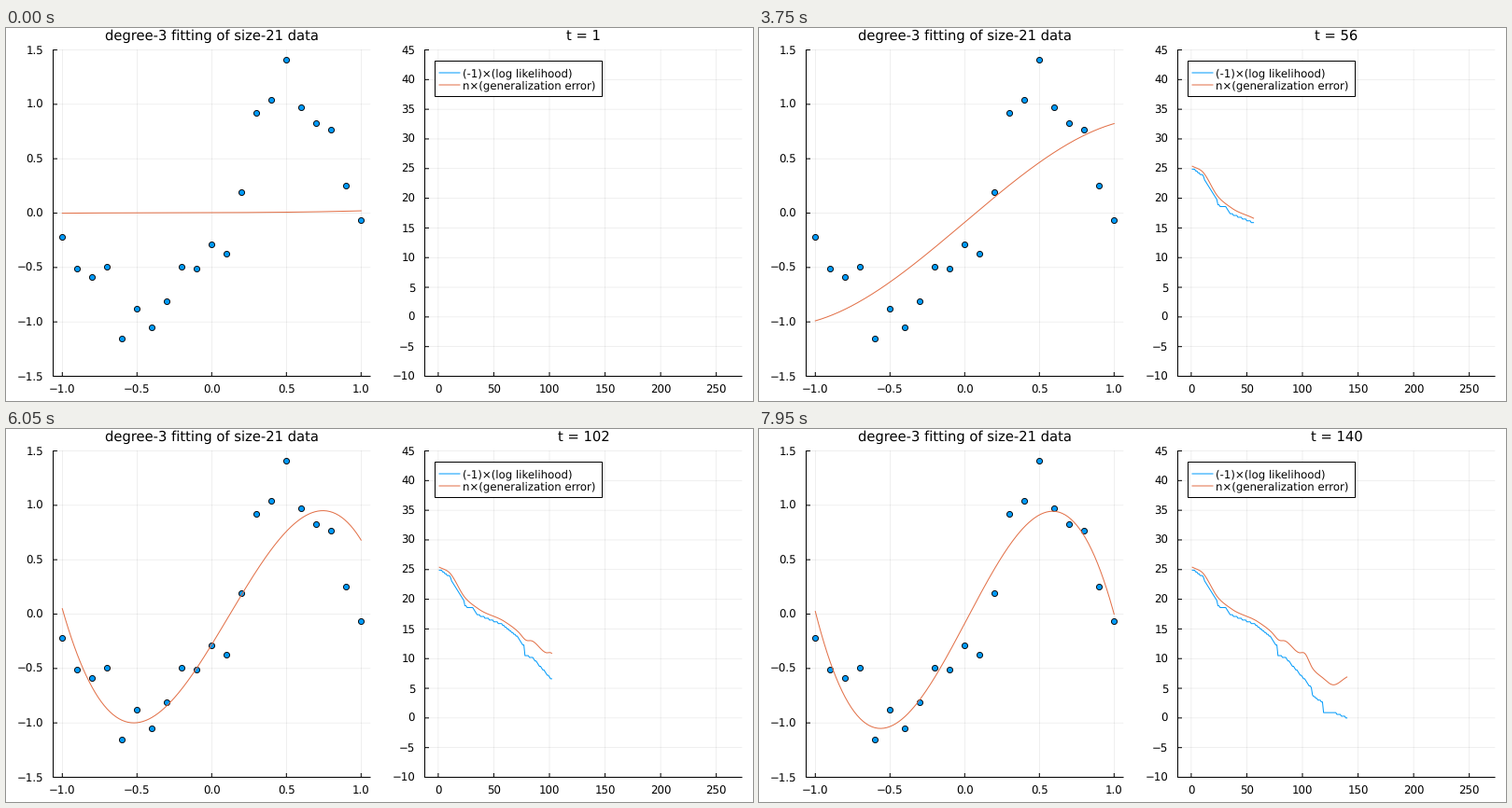
A matplotlib script for the animation above (8 s loop, 800 px wide and 400 px high).

```python
import numpy as np
import matplotlib.pyplot as plt
from matplotlib.animation import FuncAnimation

DPI = 100
PX = 72 / DPI  # points per pixel
BLUE, ORANGE = "#009afa", "#e26f46"
HOLD, FRAMES, INTERVAL = 19, 160, 50

plt.rcParams.update({"font.family": "DejaVu Sans", "text.hinting": "none"})
fig = plt.figure(figsize=(8, 4), dpi=DPI, facecolor="white")
ax = fig.add_axes([0, 0, 1, 1])
ax.set(xlim=(0, 800), ylim=(400, 0))
ax.axis("off")


class Panel:
    """Maps data coordinates to stage pixels and draws axes and grid."""

    TOP, BOTTOM = 23.5, 373.5

    def __init__(self, left, right, x0, x_unit, y_min, y_max):
        self.left, self.right = left, right
        self.x0, self.x_unit = x0, x_unit
        self.y_max = y_max
        self.y_unit = (self.BOTTOM - self.TOP) / (y_max - y_min)

    def x(self, v):
        return self.x0 + self.x_unit * np.asarray(v)

    def y(self, v):
        return self.TOP + self.y_unit * (self.y_max - np.asarray(v))

    def draw_axes(self, xticks, yticks, fmt):
        black = dict(color="black", lw=PX, snap=False)
        grid = dict(color="black", alpha=0.1, lw=0.6 * PX, snap=False)
        for v in xticks:
            x = self.x(v)
            ax.plot([x, x], [self.TOP, self.BOTTOM], **grid)
            ax.plot([x, x], [self.BOTTOM, self.BOTTOM - 4], **black)
            label(x, 391.5, fmt(v), ha="center")
        for v in yticks:
            y = self.y(v)
            ax.plot([self.left, self.right], [y, y], **grid)
            ax.plot([self.left, self.left + 4], [y, y], **black)
            label(self.left - 10.3, y + 4.3, fmt(v), ha="right")
        ax.plot([self.left, self.left, self.right],
                [self.TOP, self.BOTTOM, self.BOTTOM], **black)


def label(x, y, text, size=11.75, ha="left"):
    return ax.text(x, y, text, fontsize=size * PX, ha=ha, va="baseline")


def number(digits):
    return lambda v: f"{v:.{digits}f}".replace("-", "\u2212")


def hermite(t, keys, values):
    """Smooth curve through values given at the key iterations."""
    keys, values = np.asarray(keys), np.asarray(values)
    slopes = np.gradient(values, keys, axis=0)
    k = min(np.searchsorted(keys, t, side="right") - 1, len(keys) - 2)
    h = keys[k + 1] - keys[k]
    s = (t - keys[k]) / h
    ease = s * s * (3 - 2 * s)
    return (values[k] * (1 - ease) + values[k + 1] * ease
            + h * s * (1 - s) ** 2 * slopes[k]
            - h * s * s * (1 - s) * slopes[k + 1])


fit = Panel(50.5, 390, 220.3, 160, -1.5, 1.5)
trace = Panel(448.5, 788, 462.9, 1.191, -10, 45)
fit.draw_axes(np.arange(-1, 1.1, 0.5), np.arange(-1.5, 1.6, 0.5), number(1))
trace.draw_axes(range(0, 251, 50), range(-10, 46, 5), number(0))

label(220.3, 13, "degree-3 fitting of size-21 data", 14.74, "center")
title = label(618.5, 13, "", 14.74, "center")

samples = [-0.217, -0.51, -0.585, -0.492, -1.15, -0.88, -1.05, -0.81, -0.492,
           -0.507, -0.285, -0.372, 0.19, 0.923, 1.04, 1.41, 0.972, 0.828,
           0.767, 0.256, -0.066]
ax.scatter(fit.x(np.linspace(-1, 1, 21)), fit.y(samples), s=(6.1 * PX) ** 2,
           fc=BLUE, ec="black", lw=0.9 * PX, zorder=2)

# Legend
ax.add_patch(plt.Rectangle((459.5, 35.5), 179, 38, fc="white", ec="black",
                           lw=PX, snap=False, zorder=4))
for y, color, text in [(48, BLUE, "(-1)×(log likelihood)"),
                       (61, ORANGE, "n×(generalization error)")]:
    ax.plot([464, 486], [y, y], color=color, lw=PX, snap=False, zorder=5)
    label(489, y + 4.2, text).set_zorder(5)

# Cubic coefficients, constant term first, at a few iterations
fit_keys = [1, 18, 36, 53, 76, 102, 119, 127, 140]
fit_coefs = [
    [0.004, 0.004, 0.006, 0.007],
    [0.01, 0.155, 0.033, 0.092],
    [-0.045, 0.577, -0.04, 0.165],
    [-0.08, 1.1, -0.02, -0.2],
    [-0.11, 1.454, 0.243, -0.662],
    [-0.28, 2.24, 0.645, -1.925],
    [-0.17, 2.65, 0.3, -2.55],
    [-0.057, 2.517, 0.122, -2.582],
    [-0.085, 2.598, 0.097, -2.611],
]

steps = np.arange(1, FRAMES - HOLD)
error_keys = [1, 10, 24, 36, 60, 72, 79, 84, 97, 102, 109, 118, 127, 140]
error_values = [25.4, 24.5, 20.3, 18.4, 16.2, 14.5, 13.1, 13, 11, 10.9, 8.4,
                6.8, 5.6, 6.9]
error = [hermite(t, error_keys, error_values) for t in steps]

# The best likelihood so far falls in small steps, with a few larger drops
STEP = 0.3
like_keys = [1, 10, 18, 23, 24, 31, 35, 58, 70, 77, 78, 84, 102, 108, 109,
             118, 119, 128, 140]
like_values = [25, 23.9, 21.2, 19.8, 18.8, 18.6, 17.4, 15.7, 13.9, 12.2, 10.4,
               10.3, 6.5, 5, 3.8, 2.6, 1, 1, 0]
likelihood = STEP * np.round(np.interp(steps, like_keys, like_values) / STEP)

curve_x = np.linspace(-1, 1, 201)
curve, = ax.plot([], [], color=ORANGE, lw=PX, zorder=3)
like_line, = ax.plot([], [], color=BLUE, lw=PX, snap=False)
error_line, = ax.plot([], [], color=ORANGE, lw=PX)


def update(i):
    t = max(1, i - HOLD)
    title.set_text(f"t = {t}")
    coefs = hermite(t, fit_keys, fit_coefs)
    curve.set_data(fit.x(curve_x),
                   fit.y(np.polynomial.polynomial.polyval(curve_x, coefs)))
    for line, series in ((like_line, likelihood), (error_line, error)):
        line.set_data(trace.x(steps[:t]), trace.y(series[:t]))
    return title, curve, like_line, error_line


anim = FuncAnimation(fig, update, frames=FRAMES, interval=INTERVAL,
                     repeat=True, repeat_delay=0)
plt.show()
```
